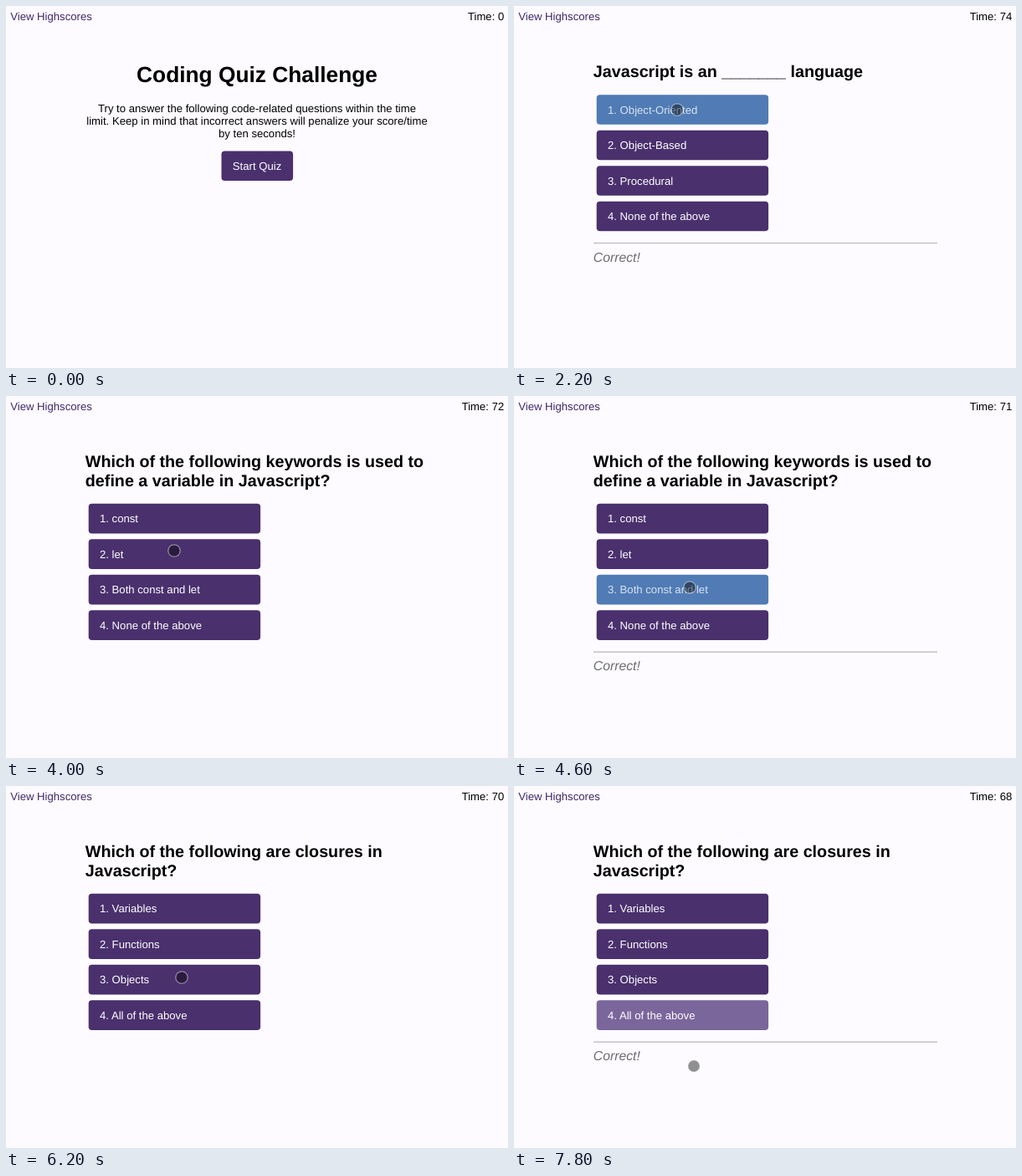
Write an HTML page that moves like this. It is 600x433 px and loops after 8 s.

```html
<!DOCTYPE html>
<html lang="en">
<head>
<meta charset="utf-8">
<title>Coding Quiz</title>
<style>
  html, body { margin: 0; width: 100%; height: 100%; overflow: hidden; background: #fdfbff; }
  svg { display: block; width: 600px; height: 433px; }
  text {
    font: 13.15px "Liberation Sans", Arial, sans-serif;
    text-rendering: geometricPrecision;
    white-space: pre;
  }
  .mid { text-anchor: middle; }
  .end { text-anchor: end; }
  .link { fill: #402767; }
  .h1 { font-size: 26.3px; font-weight: bold; }
  .h2 { font-size: 19.73px; font-weight: bold; }
  .button rect { fill: #4a306d; }
  .button text { fill: #fff; }
  .chosen rect { fill: #7b669c; }
  .tapped rect { fill: #507bb4; }
  .tapped text { fill: #d8e3f2; }
  .rule { fill: #c6c5c9; }
  .feedback { font-size: 15.78px; font-style: italic; fill: #6c6b6e; }
  #cursor { fill: #000; fill-opacity: .43; stroke: #fff; stroke-opacity: .45; stroke-width: 1.3; }
</style>
</head>
<body>
<svg viewBox="0 0 600 433">
  <text class="link" x="5.2" y="17">View Highscores</text>
  <text class="end" id="timer" x="595.3" y="17"></text>
  <g id="scene"></g>
  <circle id="cursor" r="7.2"/>
</svg>
<script>
const LOOP = 8000, STEP = 200, QUIZ_START = 600, FLASH = 200;

// start: shown from; tap: answered at; pick: index of the chosen answer
const questions = [
  { start: 600, tap: 2200, pick: 0,
    title: ["Javascript is an _______ language"],
    answers: ["Object-Oriented", "Object-Based", "Procedural", "None of the above"] },
  { start: 3200, tap: 4600, pick: 2,
    title: ["Which of the following keywords is used to", "define a variable in Javascript?"],
    answers: ["const", "let", "Both const and let", "None of the above"] },
  { start: 5800, tap: 7000, pick: 3,
    title: ["Which of the following are closures in", "Javascript?"],
    answers: ["Variables", "Functions", "Objects", "All of the above"] },
];

// time, x, y
const cursorPath = [
  [200, 303, 225], [400, 301, 189], [800, 301, 189], [1200, 235, 308],
  [1400, 225, 308], [2000, 195, 124], [3400, 195, 124], [4000, 201, 185],
  [4400, 210, 229], [6200, 210, 229], [6800, 213, 273], [7200, 213, 273],
  [7800, 215, 335],
];

const byId = id => document.getElementById(id);
const timer = byId("timer"), scene = byId("scene"), cursor = byId("cursor");

const text = (content, x, y, cls = "") =>
  `<text class="${cls}" x="${x}" y="${y}">${content}</text>`;

const button = (label, x, y, width, state = "") =>
  `<g class="button ${state}"><rect x="${x}" y="${y}" width="${width}" height="35.6" rx="4"/>` +
  text(label, x + 13.3, y + 22.3) + "</g>";

function intro(t) {
  return text("Coding Quiz Challenge", 300, 91, "h1 mid") +
    ["Try to answer the following code-related questions within the time",
     "limit. Keep in mind that incorrect answers will penalize your score/time",
     "by ten seconds!"].map((line, i) => text(line, 300, 126.8 + i * 15.1, "mid")).join("") +
    button("Start Quiz", 257.5, 173.4, 85.6, t >= QUIZ_START - FLASH ? "tapped" : "");
}

function quiz(q, t) {
  const drop = (q.title.length - 1) * 22.6;
  const answered = t >= q.tap;
  const state = t < q.tap + FLASH ? "tapped" : "chosen";
  let out = q.title.map((line, i) => text(line, 94.8, 85 + i * 22.6, "h2")).join("");
  out += q.answers.map((answer, i) =>
    button(`${i + 1}. ${answer}`, 98.7, 106.2 + drop + i * 42.5, 205.4,
      answered && i === q.pick ? state : "")).join("");
  if (answered) {
    out += `<rect class="rule" x="95" y="${282.8 + drop}" width="411" height="1.6"/>` +
      text("Correct!", 94.8, 305.8 + drop, "feedback");
  }
  return out;
}

function placeCursor(t) {
  const next = cursorPath.findIndex(p => p[0] >= t);
  cursor.style.display = t < cursorPath[0][0] ? "none" : "";
  const [t1, x1, y1] = cursorPath[next];
  const [t0, x0, y0] = cursorPath[Math.max(next - 1, 0)];
  const k = t1 > t0 ? (t - t0) / (t1 - t0) : 1;
  const ease = k * k * (3 - 2 * k);
  cursor.setAttribute("cx", x0 + (x1 - x0) * ease);
  cursor.setAttribute("cy", y0 + (y1 - y0) * ease);
}

function render(t) {
  const question = questions.filter(q => t >= q.start).pop();
  const seconds = question ? 75 - Math.floor((t - QUIZ_START) / 1000) : 0;
  timer.textContent = `Time: ${seconds}`;
  scene.innerHTML = question ? quiz(question, t) : intro(t);
  placeCursor(t);
}

const begin = performance.now();
let shown = -1;
function tick() {
  const t = Math.floor((performance.now() - begin) % LOOP / STEP) * STEP;
  if (t !== shown) render(shown = t);
  requestAnimationFrame(tick);
}
tick();
</script>
</body>
</html>
```
